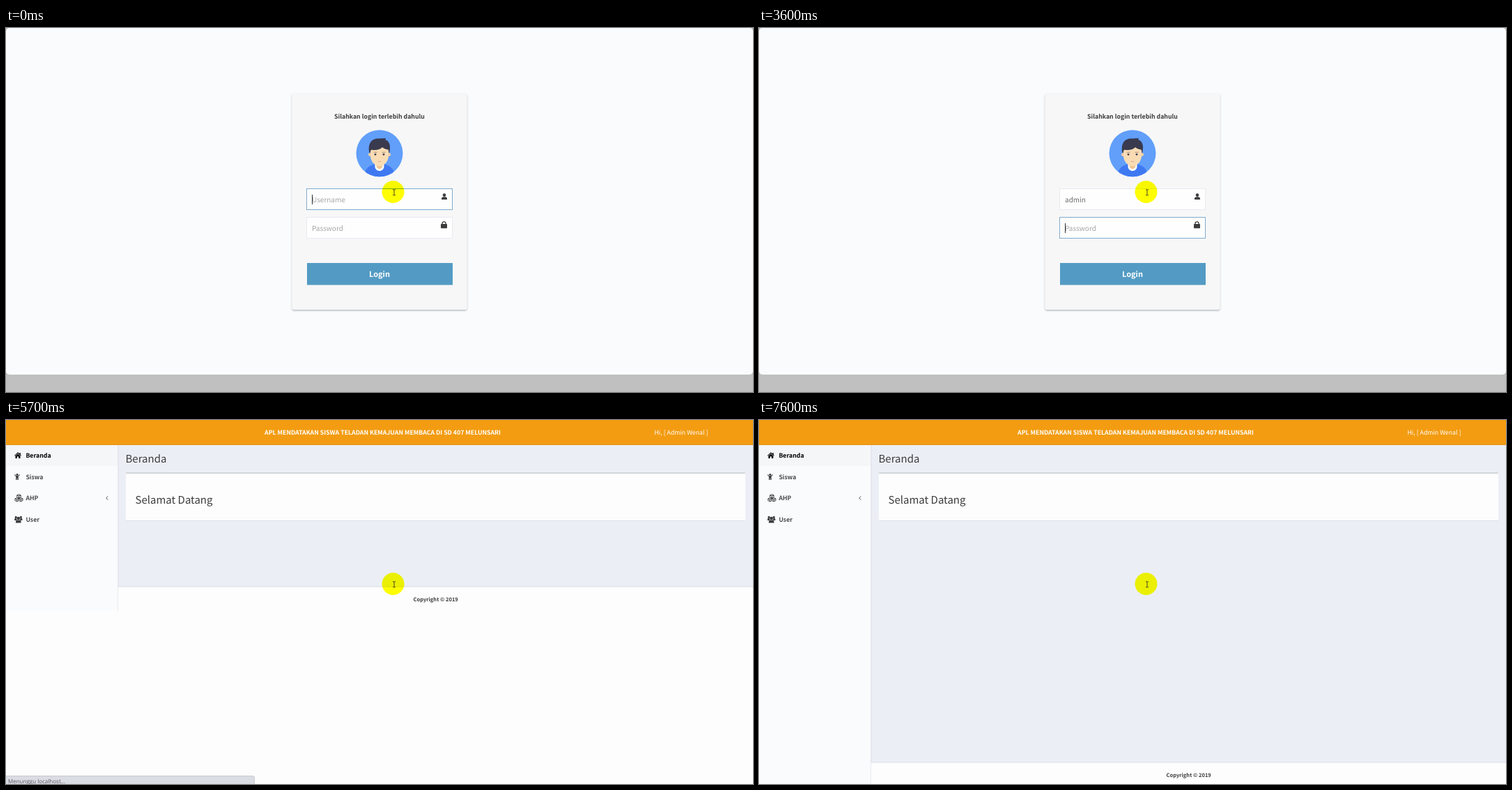
Recreate the animation shown at these times as an HTML page. Size 1072 by 522 pixels, loop 8 s.

```html
<!DOCTYPE html>
<html lang="id">
<head>
<meta charset="utf-8">
<title>Login</title>
<style>
  html, body { margin: 0; width: 100%; height: 100%; overflow: hidden; background: #fdfdfd; }
  svg { display: block; width: 1072px; height: 522px; isolation: isolate; }
  text {
    font: 8.75px "Noto Sans CJK JP", "Noto Sans CJK SC", "Noto Sans CJK", "Noto Sans", sans-serif;
    text-rendering: geometricPrecision; fill: #3c3c3e; white-space: pre;
  }
  .mid { text-anchor: middle; }
  .bold, .menu text { font-weight: 700; }
  .menu text { fill: #4c4c4f; }
  .menu .active { fill: #000; }
  .field { font-size: 10px; fill: #6c6c72; }
  .hint { fill: #a6a6a9; }
  .dots { font: 10px "Liberation Sans", sans-serif; fill: #444; }
  .big { font-size: 15px; }
  .icon { fill: #3c3c3e; }
  .input { fill: #fefefe; stroke: #e8eaf1; }
  .focus { fill: none; stroke: #7fabce; }
  .tip { font: 8px "Open Sans", "Noto Sans", sans-serif; fill: #55565a; }
</style>
</head>
<body>
<svg viewBox="0 0 1072 522">
  <defs>
    <filter id="shadow" x="-5%" y="-5%" width="110%" height="110%">
      <feDropShadow dx="0" dy="1.2" stdDeviation=".8" flood-color="#334" flood-opacity=".38"/>
    </filter>
    <clipPath id="disc"><circle cx="536" cy="179.7" r="33.5"/></clipPath>
  </defs>

  <g id="login">
    <rect width="1072" height="522" fill="#c0c0c0"/>
    <rect width="1072" height="497" rx="5" fill="#fafbfd"/>
    <rect x="410.5" y="94" width="251" height="310" rx="3" fill="#f7f7f8" filter="url(#shadow)"/>
    <text class="mid bold" x="536" y="130">Silahkan login terlebih dahulu</text>

    <g clip-path="url(#disc)">
      <rect x="502" y="146" width="68" height="68" fill="#619ffa"/>
      <path d="M514 214C514 202 521 197 530 195H542C551 197 558 202 558 214Z" fill="#3f79f2"/>
      <path d="M529.5 195H542.5V199A6.5 6 0 0 1 529.5 199Z" fill="#fff"/>
      <path d="M531.5 190H540.5V198A4.5 4 0 0 1 531.5 198Z" fill="#efc795"/>
      <circle cx="522.3" cy="181.5" r="2.4" fill="#f3cda0"/>
      <circle cx="549.7" cy="181.5" r="2.4" fill="#f3cda0"/>
      <path d="M523 170H549V183C549 191 543 198 536 198S523 191 523 183Z" fill="#f9dcb4"/>
      <path d="M522 180C520 175 520.5 169 522.5 165C525 160 530 158.3 536 158.5L545 158L544.3 160.3C549.5 162 551.5 167 551 173L550 180L548.5 174.5C545 174 542 173 540 171C537 174.5 530 176 524 174.5Z" fill="#393a4e"/>
      <path d="M527.5 178.3H532.5M539.5 178.3H544.5" stroke="#8a6f60" stroke-width=".7"/>
      <circle cx="530" cy="181.3" r="1.4" fill="#393a4e"/>
      <circle cx="542" cy="181.3" r="1.4" fill="#393a4e"/>
      <path d="M533.5 191Q536 192.5 538.5 191" fill="none" stroke="#d9a184" stroke-width=".8"/>
    </g>

    <rect class="input" x="431.5" y="230.5" width="209" height="30"/>
    <rect class="input" x="431.5" y="271.5" width="209" height="30"/>
    <rect class="focus" id="userFocus" x="431.5" y="230.5" width="209" height="30"/>
    <rect class="focus" id="passFocus" x="431.5" y="271.5" width="209" height="30"/>
    <text class="field hint" id="userHint" x="439" y="249.7">Username</text>
    <text class="field hint" id="passHint" x="439" y="290.5">Password</text>
    <text class="field" id="user" x="439" y="249.7"></text>
    <text class="dots" id="pass" x="439" y="291.2"></text>
    <rect id="caret" width="1" height="14" fill="#333"/>

    <g class="icon">
      <circle cx="629" cy="239.6" r="2.3"/>
      <path d="M625 246V244.6Q625 242.6 627.3 242.2H630.7Q633 242.6 633 244.6V246Z"/>
      <rect x="624" y="281" width="9" height="6.2" rx=".8"/>
      <path d="M626 281.5V280.2A2.5 2.3 0 0 1 631 280.2V281.5" fill="none" stroke="#3c3c3e" stroke-width="1.3"/>
    </g>
    <rect x="432" y="337" width="209" height="31.5" fill="#539bc4"/>
    <text class="mid bold" x="536" y="357.2" style="font-size:11px;fill:#fff">Login</text>
  </g>

  <g id="home">
    <rect width="1072" height="522" fill="#fdfdfd"/>
    <rect id="content" x="161" y="36" width="911" fill="#ebeff5"/>
    <rect id="side" y="36" width="161" fill="#fafbfd"/>
    <rect id="sideLine" x="160.5" y="36" width="1" fill="#d9dce4"/>
    <rect y="36" width="160" height="30" fill="#f5f6f8"/>
    <rect width="1072" height="36" fill="#f39c12"/>
    <rect y="35" width="1072" height="1" fill="#e3951b"/>
    <text class="mid bold" x="540.5" y="21.2" style="fill:#fff">APL MENDATAKAN SISWA TELADAN KEMAJUAN MEMBACA DI SD 407 MELUNSARI</text>
    <text x="930.5" y="21.2" style="fill:#fff">Hi, [ Admin Wenal ]</text>

    <g class="menu">
      <text class="active" x="28.4" y="54">Beranda</text>
      <text x="28.4" y="84.7">Siswa</text>
      <text x="28.4" y="115.4">AHP</text>
      <text x="28.4" y="146.1">User</text>
    </g>
    <g class="icon">
      <path d="M12 51L17 46.3L19.5 48.5V47H20.8V49.8L22 51L21.3 51.6L17 47.8L12.7 51.6ZM13.5 51.5L17 48.5L20.5 51.5V55H18V52.3H16V55H13.5Z" fill="#000"/>
      <circle cx="16" cy="78.3" r="1.5"/>
      <path d="M12.6 78L14.8 80H17.2L19.4 78L20 78.7L17.8 81V86H16.4V83.5H15.6V86H14.2V81L12 78.7Z"/>
      <g fill="none" stroke="#3c3c3e">
        <path id="cube" d="M18.5 106.7L21.2 107.8V110.7L18.5 111.9L15.8 110.7V107.8ZM15.8 107.8L18.5 109L21.2 107.8M18.5 109V111.9"/>
        <use href="#cube" x="-2.8" y="4.9"/>
        <use href="#cube" x="2.8" y="4.9"/>
        <path d="M146.3 109.3L143.7 111.9L146.3 114.5" stroke-width=".9"/>
      </g>
      <circle cx="14.2" cy="139.4" r="1.6"/>
      <circle cx="21.4" cy="139.4" r="1.6"/>
      <circle cx="17.8" cy="141" r="2.3"/>
      <path d="M12.2 144V142Q12.2 141 13.4 141H15Q15.2 143 16 143.3L14.6 144ZM23.4 144V142Q23.4 141 22.2 141H20.6Q20.4 143 19.6 143.3L21 144Z"/>
      <path d="M14 147.5V146Q14 143.7 16 143.5H19.6Q21.6 143.7 21.6 146V147.5Z"/>
    </g>

    <text class="big" x="171.5" y="60.7">Beranda</text>
    <rect x="172" y="76" width="889" height="68.8" rx="2" fill="#d5d9de"/>
    <rect x="172" y="75" width="889" height="69" rx="2" fill="#fdfdfd"/>
    <rect x="172" y="75" width="889" height="2" rx="1" fill="#d2d6da"/>
    <text class="big" x="185.5" y="119.8">Selamat Datang</text>

    <g id="footer">
      <rect x="161" width="911" height="35" fill="#fdfdfd"/>
      <rect x="161" y="-.5" width="911" height="1" fill="#d9dde3"/>
      <text class="mid bold" x="616.7" y="21" style="font-size:7.5px">Copyright © 2019</text>
    </g>
  </g>

  <g id="status">
    <path d="M-1 510.5H354Q356.5 510.5 356.5 513V523H-1Z" fill="#dadde3" stroke="#bfc1c7" stroke-width=".8"/>
    <text class="tip" x="3" y="521">Menunggu localhost...</text>
  </g>

  <circle cx="555.5" cy="235" r="16" fill="#ff0" style="mix-blend-mode:multiply"/>
  <path d="M555 231.8H556.4L557 232.4L557.6 231.8H559M557 232V239.6M555 239.8H556.4L557 239.2L557.6 239.8H559" fill="none" stroke="#3a3a20" stroke-width=".9"/>
</svg>

<script>
const LOOP = 8000, TAB = 3300, LOADED = 5700, STRETCHED = 5800;
const userKeys = [1900, 2100, 2300, 2500, 2700];
const passKeys = [3900, 4000, 4050, 4100, 4200];
const caretShown = [[0, 300], [800, 1300], [1800, 3200], [TAB, 4800]];

const el = id => document.getElementById(id);
const set = (id, attrs) => {
  for (const name in attrs) el(id).setAttribute(name, attrs[name]);
};
const show = (id, on) => set(id, { visibility: on ? "visible" : "hidden" });
const ramp = (t, from, to) => Math.min(1, Math.max(0, (t - from) / (to - from)));
const pressed = (keys, t) => keys.filter(k => t >= k).length;

function drawLogin(t) {
  const typed = pressed(userKeys, t), dots = pressed(passKeys, t);
  el("user").textContent = "admin".slice(0, typed);
  el("pass").textContent = "•".repeat(dots);
  show("userHint", !typed);
  show("passHint", !dots);

  const shift = ramp(t, TAB, TAB + 150);
  set("userFocus", { opacity: 1 - shift });
  set("passFocus", { opacity: shift });

  const inPass = t >= TAB;
  const width = (inPass ? dots : typed) ? el(inPass ? "pass" : "user").getComputedTextLength() : 0;
  set("caret", { x: Math.round(439 + width), y: inPass ? 280 : 239 });
  show("caret", caretShown.some(([a, b]) => t >= a && t < b));
}

function drawHome(t) {
  const full = t >= STRETCHED, end = full ? 491 : 239;
  const sideHeight = full ? 486 : 238;
  set("content", { height: end - 36 });
  set("side", { height: sideHeight });
  set("sideLine", { height: sideHeight });
  set("footer", { transform: `translate(0 ${end})` });
}

function frame(now) {
  const t = now % LOOP, home = t >= LOADED;
  set("login", { display: home ? "none" : "inline" });
  set("home", { display: home ? "inline" : "none" });
  home ? drawHome(t) : drawLogin(t);
  set("status", { opacity: ramp(t, 4750, 5100) - ramp(t, 7300, 7600) });
}

const start = performance.now();
function tick() {
  frame(performance.now() - start);
  requestAnimationFrame(tick);
}
tick();
</script>
</body>
</html>
```
